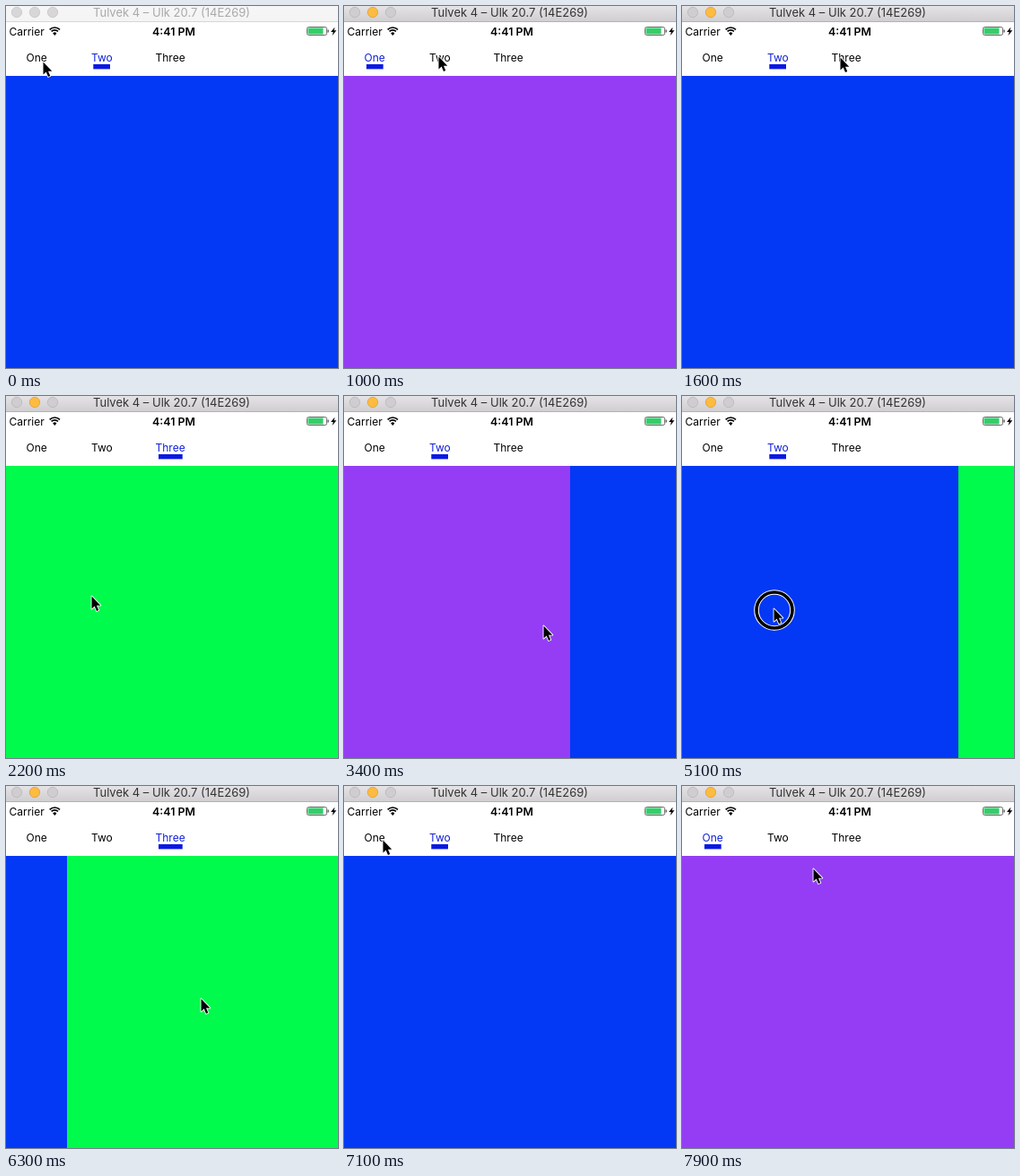
An HTML page with a canvas that plays this animation: 370x404 px, repeating every 8 s.

```html
<!DOCTYPE html>
<html lang="en">
<head>
<meta charset="utf-8">
<title>Tab pager</title>
<style>
  html, body { margin: 0; width: 100%; height: 100%; overflow: hidden; background: #fff; }
  canvas { display: block; width: 370px; height: 404px; }
</style>
</head>
<body>
<canvas id="stage" width="370" height="404"></canvas>
<script>
const W = 370, H = 404, LOOP = 8000, STEP = 100, TOP = 78;
const DRAG = 300, PULL = .184, SETTLE = 41.5, SLIDE = 400, TRAVEL = 400, REST = 100;
const ctx = document.getElementById('stage').getContext('2d');
const FONT = 'Inter, "Open Sans", sans-serif';
const PAGES = ['#953df5', '#0338f5', '#00fb4c'];
const TABS = [
  { text: 'One', x: 22.5, bar: 25, width: 18.7 },
  { text: 'Two', x: 95, bar: 97.3, width: 18.7 },
  { text: 'Three', x: 166.5, bar: 170, width: 26.7 }
];

// Each gesture lets go at its release time, starts at x, y and leads to page `to`.
const tap = (release, to, x, y) => ({ release, press: release, to, x, y, tap: true });
const swipe = (release, to, x, y) => ({ release, press: release - DRAG, to, x, y });
const GESTURES = [
  tap(100, 0, 41, 62), tap(1000, 1, 105, 56), tap(1700, 2, 176, 57),
  swipe(2800, 1, 95, 223), swipe(3361, 0, 154, 256),
  swipe(4400, 1, 200, 245), swipe(5113, 2, 164, 237),
  swipe(6300, 1, 149, 237), tap(7500, 0, 43, 60)
];
const EXIT = { x: 148, y: 93, press: LOOP };
GESTURES.forEach((g, i) => {
  g.from = i ? GESTURES[i - 1].to : 1;
  g.next = GESTURES[i + 1] || EXIT;
});

const clamp = v => Math.min(1, Math.max(0, v));
const smooth = v => v * v * (3 - 2 * v);
const easeOut = v => 1 - (1 - v) ** 3;
const mix = (a, b, k) => a + (b - a) * k;

const pulled = (g, t) => g.tap ? 0 : PULL * clamp((t - g.press) / DRAG) ** 2;

function progress(g, t) {
  const after = t - g.release;
  if (g.tap) return smooth(clamp(after / SLIDE));
  return after < 0 ? pulled(g, t) : mix(PULL, 1, 1 - Math.exp(-after / SETTLE));
}

function stateAt(t) {
  const g = GESTURES.filter(item => item.press <= t).pop() || GESTURES[0];
  const after = t - g.release;
  const arrived = after > (g.tap ? 0 : 250);
  const leave = g.release + REST;
  const travel = easeOut(clamp((t - leave) / Math.min(TRAVEL, g.next.press - leave)));
  const x = g.x - (g.to - g.from) * W * pulled(g, t);
  return {
    page: mix(g.from, g.to, progress(g, t)),
    selected: arrived ? g.to : g.from,
    pressed: g.tap ? after > 0 && after <= REST : after < 0,
    x: Math.round(mix(x, g.next.x, travel)),
    y: Math.round(mix(g.y, g.next.y, travel))
  };
}

function rect(x, y, w, h, fill) {
  ctx.fillStyle = fill;
  ctx.fillRect(x, y, w, h);
}

function text(str, x, y, color, size = 12, weight = 400, align = 'left') {
  ctx.font = `${weight} ${size}px ${FONT}`;
  ctx.textAlign = align;
  ctx.fillStyle = color;
  ctx.fillText(str, x, y);
}

function circle(x, y, r, stroke, width, fill) {
  ctx.beginPath();
  ctx.arc(x, y, r, 0, Math.PI * 2);
  if (fill) { ctx.fillStyle = fill; ctx.fill(); }
  ctx.strokeStyle = stroke;
  ctx.lineWidth = width;
  ctx.stroke();
}

function polygon(points, x = 0, y = 0) {
  ctx.beginPath();
  points.forEach(([px, py]) => ctx.lineTo(x + px, y + py));
  ctx.closePath();
}

function titleBar(active) {
  const shade = ctx.createLinearGradient(0, 0, 0, 17);
  shade.addColorStop(0, active ? '#e5e3e5' : '#f6f6f6');
  shade.addColorStop(1, active ? '#d0ced0' : '#f4f4f4');
  rect(0, 0, W, 17, shade);
  rect(0, 17, W, 1, active ? '#b4b2b4' : '#d6d6d6');
  [12, 32, 52].forEach((x, i) => {
    const lit = active && i === 1;
    circle(x, 7, 5.7, lit ? '#dfa035' : active ? '#b9b7b9' : '#c8c6c8', .8,
      lit ? '#fdbb40' : active ? '#cfcdcf' : '#d8d6d8');
  });
  text('Tulvek 4 – Ulk 20.7 (14E269)', 184.5, 12, active ? '#333' : '#a9a9a9', 13, 400, 'center');
}

function statusBar() {
  text('Carrier', 3.5, 32.5, '#000');
  text('4:41 PM', 187, 32.5, '#000', 12.4, 600, 'center');

  ctx.strokeStyle = '#000';
  ctx.lineWidth = 1.7;
  [8, 5.2].forEach(r => {
    ctx.beginPath();
    ctx.arc(54.3, 32, r, -Math.PI * .75, -Math.PI * .25);
    ctx.stroke();
  });
  ctx.beginPath();
  ctx.moveTo(54.3, 33);
  ctx.arc(54.3, 32.5, 3, -Math.PI * .75, -Math.PI * .25);
  ctx.fillStyle = '#000';
  ctx.fill();

  ctx.beginPath();
  ctx.roundRect(335.5, 23.5, 22, 9, 2);
  ctx.strokeStyle = '#666';
  ctx.lineWidth = 1;
  ctx.stroke();
  rect(336.5, 24.5, 17, 7, '#35cd6a');
  rect(358.5, 26.5, 1.3, 3, '#555');
  polygon([[366.5, 23.5], [362, 29], [364.7, 29], [363.5, 33], [368.3, 27.3], [365.5, 27.3]]);
  ctx.fillStyle = '#000';
  ctx.fill();
}

function tabBar(selected) {
  TABS.forEach((tab, i) => {
    const on = i === selected;
    text(tab.text, tab.x, 62, on ? '#1020d8' : '#000');
    if (on) rect(tab.bar, 65, tab.width, 5.4, '#0a18e4');
  });
}

function pointer(x, y, pressed) {
  if (pressed) {
    circle(x + 1, y + 2, 20, '#fff', 5.6);
    circle(x + 1, y + 2, 20, '#000', 3.6);
  }
  polygon([[.5, .5], [.5, 14.5], [3.7, 11.6], [6, 17], [8.3, 16], [6, 10.7], [10.3, 10.7]], x, y);
  ctx.lineJoin = 'round';
  ctx.strokeStyle = '#fff';
  ctx.lineWidth = 1.8;
  ctx.stroke();
  ctx.fillStyle = '#000';
  ctx.fill();
}

function draw(t) {
  const { page, selected, pressed, x, y } = stateAt(t);
  rect(0, 0, W, H, '#fff');
  titleBar(t >= GESTURES[0].press);
  statusBar();
  tabBar(selected);
  PAGES.forEach((color, i) => rect(Math.round((i - page) * W), TOP, W, H - TOP, color));
  pointer(x, y, pressed);
}

const start = performance.now();
function tick() {
  const t = (performance.now() - start) % LOOP;
  draw(Math.floor(t / STEP) * STEP);
  requestAnimationFrame(tick);
}
tick();
</script>
</body>
</html>
```
